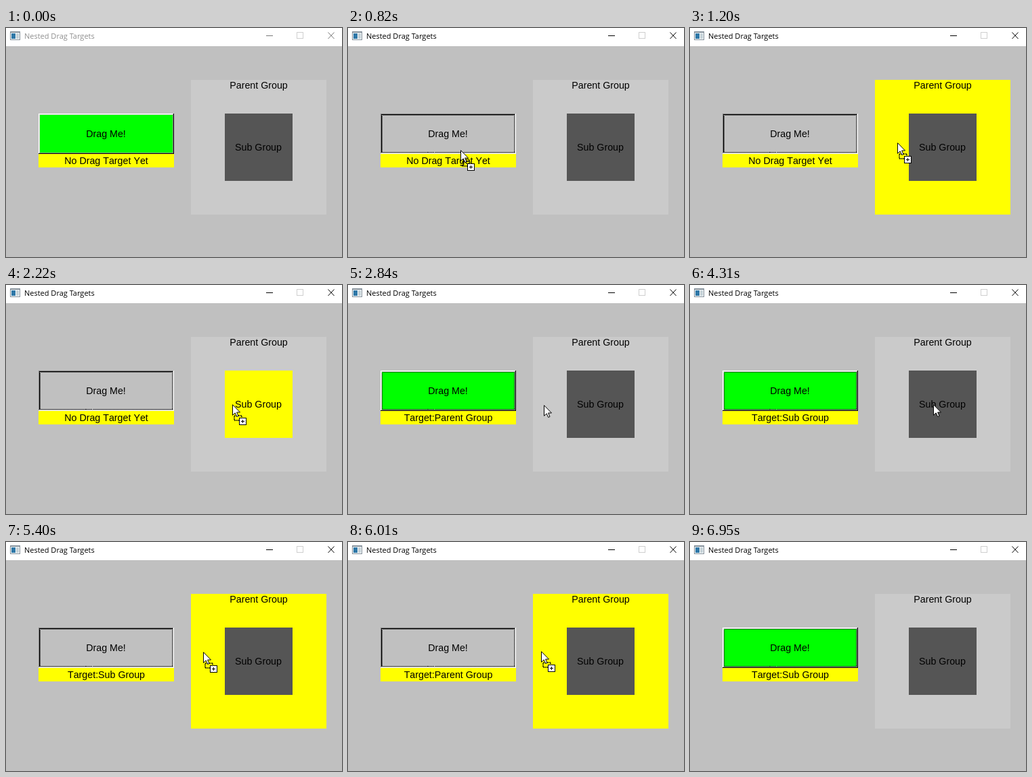
Write an HTML page that moves like this. It is 496 by 340 pixels and loops after 8.26 s.

```html
<!DOCTYPE html>
<html lang="en">
<head>
<meta charset="utf-8">
<title>Nested Drag Targets</title>
<style>
  html, body { margin: 0; width: 100%; height: 100%; overflow: hidden; background: #c0c0c0; }
  svg { display: block; width: 496px; height: 340px; }
  text { font: 14.25px "Liberation Sans", Arial, sans-serif; font-kerning: none; text-anchor: middle; }
  #title { font: 11px "Open Sans", "Noto Sans", sans-serif; text-anchor: start; }
  .crisp { shape-rendering: crispEdges; }
  .line { fill: none; }
</style>
</head>
<body>
<svg viewBox="0 0 496 340">
  <rect width="496" height="340" fill="#c0c0c0"/>
  <rect width="496" height="27" fill="#fff"/>

  <g class="crisp">
    <rect x="6" y="5" width="15" height="13" fill="#85919b"/>
    <rect x="7" y="7" width="13" height="10" fill="#f4f8fa"/>
    <rect x="8" y="8" width="6" height="8" fill="#2f78a8"/>
    <rect x="15" y="8" width="4" height="8" fill="#c5d2d8"/>
  </g>
  <text id="title" x="27" y="16">Nested Drag Targets</text>
  <g id="controls" class="line">
    <path class="crisp" d="M384 11.5h10"/>
    <path d="M475.5 6.5l9 9.5M484.500 6.500l-9 9.500"/>
  </g>
  <rect class="line crisp" x="429.500" y="6.500" width="9" height="9" stroke="#cfcfcf"/>

  <rect id="parent" class="crisp" x="273" y="77" width="200" height="200"/>
  <rect id="sub" class="crisp" x="323" y="127" width="100" height="100"/>
  <text x="373" y="90">Parent Group</text>
  <text x="372.500" y="182">Sub Group</text>

  <rect class="crisp" x="48" y="187" width="200" height="20" fill="#ff0"/>
  <text id="status" x="148" y="202"></text>

  <g class="line crisp">
    <rect id="face" x="48" y="127" width="200" height="60"/>
    <path id="outerLight" d="M48.500 186V127.500H247"/>
    <path id="outerDark" d="M48 186.500H247.500V127"/>
    <path id="innerLight" d="M49.500 185V128.500H246"/>
    <path id="innerDark" d="M49 185.500H246.500V128"/>
    <rect id="focus" x="50.500" y="129.500" width="195" height="55" stroke="#000" stroke-dasharray="1 1"/>
  </g>
  <text x="147.500" y="162">Drag Me!</text>

  <g id="cursor">
    <rect id="ghost" class="line crisp" x="3" y="17" width="11" height="7" stroke="#000" stroke-width="2" stroke-dasharray="1 1"/>
    <path d="M.5.7V16.300L4.200 12.900 6.700 18.500 9 17.500 6.600 12H11.500Z" fill="#fff" stroke="#000"/>
    <g id="plus" class="crisp">
      <rect x="10.500" y="20.500" width="10" height="10" fill="#fff" stroke="#000"/>
      <path d="M13 25.500h5M15.500 23v5" stroke="#000"/>
    </g>
  </g>
</svg>
<script>
const LOOP = 8260;
const YELLOW = '#ff0';
const el = id => document.getElementById(id);
const set = (id, name, value) => el(id).setAttribute(name, value);
const show = (id, on) => set(id, 'visibility', on ? 'visible' : 'hidden');

// Pointer moves: start, tick length, tick count, evenly timed way points
const moves = [
  { at: 70, tick: 73, count: 5, path: [[389, 297], [184, 185]] },
  { at: 510, tick: 78, count: 6, path: [[184, 185], [161, 180]] },
  { at: 1050, tick: 80, count: 7, path: [[205, 176], [306, 170], [350, 174], [365, 176]] },
  { at: 2060, tick: 77, count: 7, path: [[357, 177], [289, 178]] },
  { at: 3070, tick: 80, count: 3, path: [[255, 184], [200, 180], [169, 173]] },
  { at: 3380, tick: 76, count: 9, path: [[169, 173], [280, 175], [359, 177]] },
  { at: 4310, tick: 78, count: 11, path: [[359, 177], [174, 172], [168, 174]] },
  { at: 5160, tick: 80, count: 4, path: [[195, 168], [291, 163]] },
  { at: 5630, tick: 75, count: 3, path: [[291, 163], [175, 170]] },
  { at: 5930, tick: 78, count: 6, path: [[175, 170], [285, 162], [325, 165], [352, 169], [372, 172], [386, 173]] },
  { at: 6870, tick: 80, count: 1, path: [[409, 196]] }
];

const drags = [
  { press: 510, drop: 2840, target: 'Parent Group' },
  { press: 3380, drop: 4310, target: 'Sub Group' },
  { press: 4850, drop: 5630, target: 'Parent Group' },
  { press: 5930, drop: 6700, target: 'Sub Group' }
];

function pointerAt(t) {
  const move = moves.findLast(m => t >= m.at);
  if (!move || t >= 6950) return null;
  const { at, tick, count, path } = move;
  const step = Math.min(count - 1, Math.floor((t - at + 10) / tick));
  const s = step / Math.max(1, count - 1) * (path.length - 1);
  const i = Math.floor(s);
  const a = path[i], b = path[i + 1] || a;
  return a.map((v, axis) => Math.round(v + (b[axis] - v) * (s - i)));
}

const inside = (p, x, y, size) =>
  p[0] >= x && p[0] < x + size && p[1] >= y && p[1] < y + size;

function drawButton(pressed, focused) {
  set('face', 'fill', pressed ? '#c0c0c0' : '#0f0');
  set('outerLight', 'stroke', pressed ? '#8a8a8a' : '#fff');
  set('outerDark', 'stroke', pressed ? '#fff' : '#000');
  set('innerLight', 'stroke', pressed ? '#000' : '#d5d5d5');
  set('innerDark', 'stroke', pressed ? '#ababab' : '#8a8a8a');
  show('focus', focused);
}

function render(t) {
  const pointer = pointerAt(t);
  const drag = drags.find(d => t >= d.press && t < d.drop);
  const dropped = drags.findLast(d => t >= d.drop);
  const active = t >= drags[0].press;
  const overSub = drag && inside(pointer, 323, 127, 100);
  const overParent = drag && !overSub && inside(pointer, 273, 77, 200);

  set('title', 'fill', active ? '#000' : '#8f8f8f');
  set('controls', 'stroke', active ? '#000' : '#777');
  set('parent', 'fill', overParent ? YELLOW : '#cacaca');
  set('sub', 'fill', overSub ? YELLOW : '#555');
  el('status').textContent = dropped ? 'Target:' + dropped.target : 'No Drag Target Yet';
  drawButton(Boolean(drag), active);

  const carrying = pointer && drag && t >= drag.press + 70;
  show('cursor', pointer);
  show('ghost', carrying);
  show('plus', carrying);
  if (pointer) set('cursor', 'transform', `translate(${pointer})`);
}

const start = performance.now();
function loop() {
  render((performance.now() - start) % LOOP);
  requestAnimationFrame(loop);
}
loop();
</script>
</body>
</html>
```
